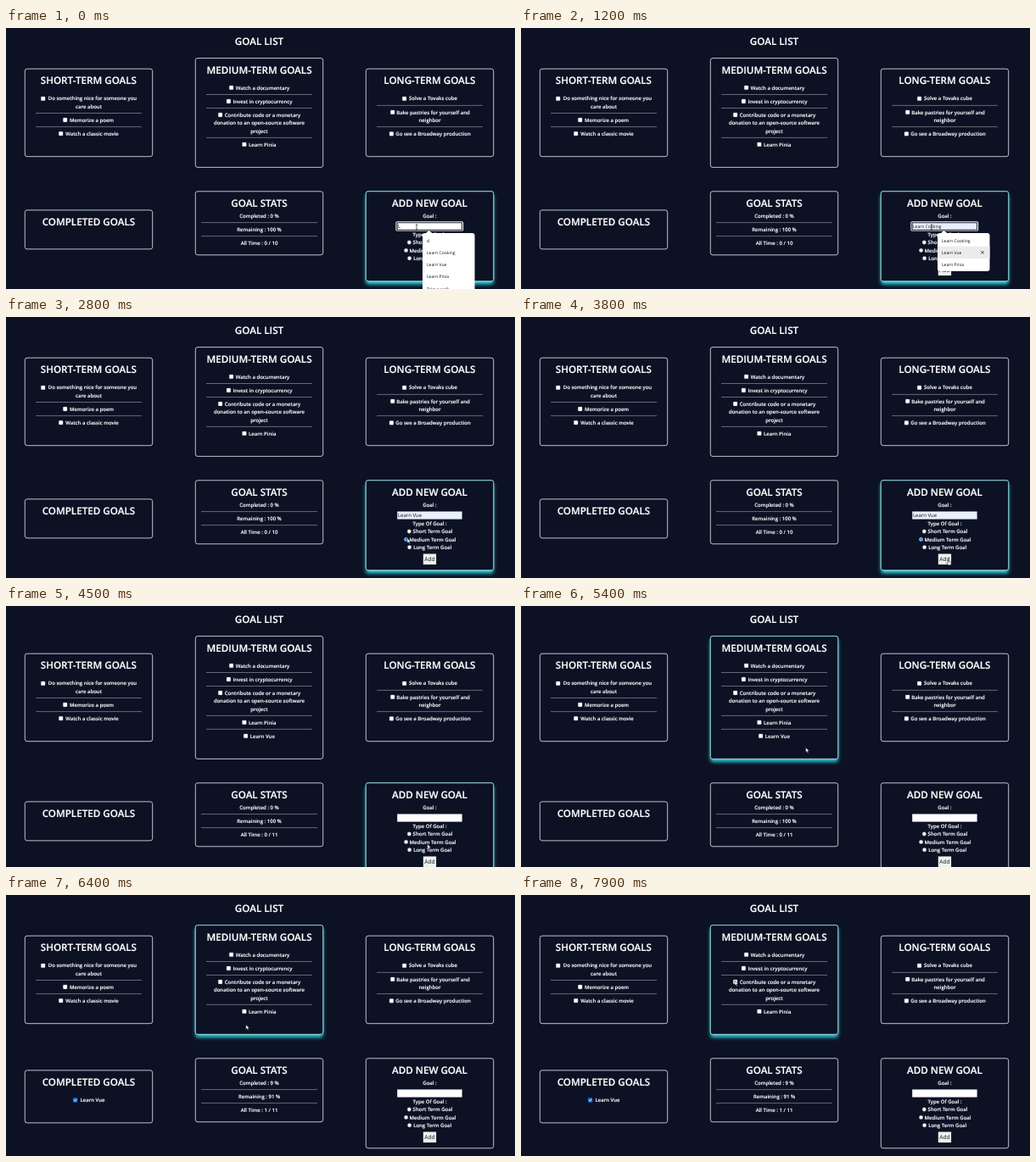
Write an HTML page that moves like this. It is 600 by 308 pixels and loops after 8 s.

```html
<!DOCTYPE html>
<html lang="en">
<head>
<meta charset="utf-8">
<title>Goal list</title>
<style>
  html, body { margin: 0; width: 100%; height: 100%; overflow: hidden; background: #0c1224; }
  svg { display: block; width: 600px; height: 308px; text-rendering: geometricPrecision; }
  text {
    font: 600 6px "Open Sans", "Noto Sans", sans-serif; text-anchor: middle;
    fill: #fff; stroke: #fff; stroke-width: .14px;
  }
  .head { font-size: 11.65px; stroke-width: .2px; }
  .field, .option, .button { font-weight: 400; fill: #111; stroke: none; }
  .field, .option { text-anchor: start; }
  .option { font-size: 5px; }
  .button { font-size: 6.6px; }
</style>
</head>
<body>
<svg viewBox="0 0 600 308" xmlns="http://www.w3.org/2000/svg">
  <defs>
    <filter id="blur" x="-20%" y="-20%" width="140%" height="140%"><feGaussianBlur stdDeviation="2.2"/></filter>
  </defs>
  <g id="scene"></g>
</svg>
<script>
const LOOP = 8000, BG = '#0c1224';
const FILTERED = 300, COOKING = 800, VUE = 1200, PREVIEW_VUE = 1300, ACCEPT = 1700;
const RADIO = 2700, ADD = 4200, LEAVE_ADD = 4700, ENTER_MEDIUM = 4900, DONE = 6400;

// Pointer stops: time, x, y
const path = [
  [0, 484, 232], [2000, 484, 232], [2600, 473, 261], [2900, 473, 261], [3600, 504, 286],
  [4400, 504, 286], [5200, 335.6, 167], [5500, 335.6, 167], [6100, 282.8, 153], [7000, 282.8, 153],
  [7800, 252, 101], [8000, 252, 101]
];

const scene = document.getElementById('scene');
const clamp = v => Math.max(0, Math.min(1, v));
const ease = v => v * v * (3 - 2 * v);
const ramp = (t, start) => clamp((t - start) / 300);

const rect = (x, y, w, h, fill, extra = '') =>
  `<rect x="${x}" y="${y}" width="${w}" height="${h}" fill="${fill}" ${extra}/>`;
const text = (s, x, y, cls = '') => `<text x="${x}" y="${y + 2.1}" class="${cls}">${s}</text>`;
const head = (s, x, y) => `<text x="${x}" y="${y + 4.1}" class="head">${s}</text>`;
const rule = (x1, x2, y) => `<path d="M${x1} ${y}H${x2}" stroke="#8a8d98" stroke-width=".7"/>`;
const group = (dy, body) => `<g transform="translate(0 ${dy})">${body}</g>`;

function card(x, y, h, glow = 0) {
  const frame = (stroke, extra = '') => rect(x, y, 150.4, h, BG, `rx="2.6" stroke="${stroke}" stroke-width=".85" ${extra}`);
  if (!glow) return frame('#dfe2e8');
  return rect(x, y + 3.6, 150.4, h, '#2fd0da', `rx="3" filter="url(#blur)" opacity="${glow}"`) +
    frame('#dfe2e8') + frame('#8fe6ec', `opacity="${glow}"`);
}

function box(x, y, checked) {
  return rect(x, y - 2.4, 4.8, 4.8, checked ? '#1a7df0' : '#fff',
    `rx=".8" stroke="${checked ? '#1a7df0' : '#999'}" stroke-width=".3"`) +
    (checked ? `<path d="M${x + 1} ${y}l1.1 1.2 1.9-2.4" fill="none" stroke="#fff" stroke-width=".8"/>` : '');
}

const item = (s, boxX, textX, y, checked) => box(boxX, y, checked) + text(s, textX, y);

function radio(s, cx, textX, y, on) {
  const dot = on ? `<circle cx="${cx}" cy="${y}" r="1.3" fill="#1a7df0"/>` : '';
  return `<circle cx="${cx}" cy="${y}" r="2.2" fill="#fff" stroke="${on ? '#1a7df0' : '#999'}" stroke-width=".5"/>` +
    dot + text(s, textX, y);
}

function shortGoals() {
  return card(22.3, 48.2, 103.5) + head('SHORT-TERM GOALS', 97.4, 62.2) +
    item('Do something nice for someone you', 41.3, 102, 83.3) + text('care about', 97.5, 93) + rule(35, 160, 100.5) +
    item('Memorize a poem', 67.3, 101, 108.5) + rule(35, 160, 116.6) +
    item('Watch a classic movie', 62.3, 101.5, 124.7);
}

function mediumGoals(withVue, glow) {
  return card(223.3, 35.6, withVue ? 144.8 : 128.8, glow) + head('MEDIUM-TERM GOALS', 298.5, 49.6) +
    item('Watch a documentary', 263.2, 302.5, 70.4) + rule(236, 361, 78.5) +
    item('Invest in cryptocurrency', 260, 302.5, 86.5) + rule(236, 361, 94.5) +
    item('Contribute code or a monetary', 250.2, 302.5, 102.5) +
    text('donation to an open-source software', 298.5, 112) + text('project', 298.5, 121.5) + rule(236, 361, 129.4) +
    item('Learn Pinia', 278.5, 302.2, 137.4) +
    (withVue ? rule(236, 361, 145.4) + item('Learn Vue', 280.2, 302.3, 153.4) : '');
}

function longGoals() {
  return card(424.3, 48.2, 103.5) + head('LONG-TERM GOALS', 499.4, 62.2) +
    item('Solve a Tovaks cube', 467.2, 503.5, 83.3) + rule(437, 562, 91.4) +
    item('Bake pastries for yourself and', 453.3, 503.5, 99.4) + text('neighbor', 499.5, 109) + rule(437, 562, 116.6) +
    item('Go see a Broadway production', 452, 503.5, 124.8);
}

function completed(done) {
  const y = done ? 206.9 : 214.9;
  return card(22.3, y, done ? 62 : 46) + head('COMPLETED GOALS', 97.4, y + 14.2) +
    (done ? item('Learn Vue', 79.2, 102, 242, true) : '');
}

function stats(done, total) {
  const percent = Math.round(100 * done / total);
  return card(223.3, 192.8, 75) + head('GOAL STATS', 298.5, 206.9) +
    text(`Completed : ${percent} %`, 298.5, 221.6) + rule(230, 367, 229.6) +
    text(`Remaining : ${100 - percent} %`, 298.5, 237.7) + rule(230, 367, 245.6) +
    text(`All Time : ${done} / ${total}`, 298.5, 253.8);
}

function input(t) {
  const filled = t >= COOKING && t < ADD;
  const focus = t < RADIO
    ? rect(460, 228.8, 78.5, 10.2, 'none', 'rx="1" stroke="#fff" stroke-width="1.2"') +
      rect(461, 229.8, 76.5, 8.4, 'none', 'stroke="#20242f" stroke-width=".9"') : '';
  let value = '', cls = 'field';
  if (t < COOKING) value = 'L';
  else if (t < PREVIEW_VUE) [value, cls] = ['Learn Cooking', 'option'];
  else if (t < ACCEPT) [value, cls] = ['Learn Vue', 'option'];
  else if (t < ADD) value = 'Learn Vue';
  const caret = t >= ACCEPT && t < RADIO && (t - ACCEPT) % 1000 < 500 ? rect(490, 231, .6, 6.5, '#111') : '';
  return rect(461.2, 229.5, 76.4, 9.1, filled ? '#e8f0fe' : '#fff') + focus + text(value, 462, 234.3, cls) + caret;
}

function newGoal(t, glow) {
  return card(424.3, 192.8, 106, glow) + head('ADD NEW GOAL', 499.4, 206.9) + text('Goal :', 499.5, 221.6) + input(t) +
    text('Type Of Goal :', 499.5, 243.6) +
    radio('Short Term Goal', 475.3, 503, 253) +
    radio('Medium Term Goal', 471.6, 503, 262.4, t >= RADIO && t < ADD) +
    radio('Long Term Goal', 475.6, 502.7, 271.7) +
    rect(491.8, 279.5, 15.3, 12.6, '#efefef') + text('Add', 499.5, 286, 'button');
}

function dropdown(t) {
  if (t >= ACCEPT) return '';
  const goals = ['Learn Cooking', 'Learn Vue', 'Learn Pinia'];
  const rows = t < FILTERED ? ['d', ...goals, 'Take a walk'] : goals;
  const picked = t < COOKING ? -1 : t < VUE ? 0 : 1;
  const height = rows.length * 14.2 + 2.4;
  return `<path d="M494.5 242.5l4-3.6 4 3.6z" fill="#fff"/>` + rect(491, 242, 61.5, height, '#fff', 'rx="3"') +
    rows.map((s, i) => {
      const y = 250.6 + i * 14.2;
      const mark = i === picked
        ? rect(491, y - 7.1, 61.5, 14.2, '#ececec') +
          `<path d="M542.3 ${y - 1.7}l3.4 3.4m0 -3.4l-3.4 3.4" stroke="#222" stroke-width=".8"/>` : '';
      return mark + text(s, 496, y, 'option');
    }).join('');
}

function pointer(t) {
  const i = path.findIndex(p => p[0] > t);
  const [a, b] = [path[i - 1], path[i]];
  const k = ease((t - a[0]) / (b[0] - a[0]));
  const x = a[1] + (b[1] - a[1]) * k, y = a[2] + (b[2] - a[2]) * k;
  const outline = 'fill="#fff" stroke="#111" stroke-width=".5" stroke-linejoin="round"';
  let shape = `<path d="M0 0v5.6l1.3-1.1 1 2.1 1-.5-1-2h1.7z" ${outline}/>`;
  if (y < 239 && x > 461) shape = '<path d="M-1.2 0h2.4M0 0v6M-1.2 6h2.4" stroke="#222" stroke-width=".7"/>';
  else if (t >= 3500 && t < 4500)
    shape = `<path d="M-.6 .4q.6-.8 1.2 0v2.2l2.4.6q.5 1.8-.5 3.6h-2.9l-2-2.6q.5-.8 1.8.2z" ${outline}/>`;
  return `<g transform="translate(${x} ${y})">${shape}</g>`;
}

function draw(t) {
  const added = t >= ADD, done = t >= DONE, grown = added && !done;
  const shift = grown ? 16 : 0;
  const addGlow = 1 - ramp(t, LEAVE_ADD), mediumGlow = ramp(t, ENTER_MEDIUM);
  scene.innerHTML = rect(0, 0, 600, 308, BG) + head('GOAL LIST', 298.5, 16.2) +
    group(shift / 2, shortGoals() + longGoals()) +
    mediumGoals(grown, mediumGlow) +
    group(shift, completed(done) + stats(done ? 1 : 0, added ? 11 : 10) + newGoal(t, addGlow)) +
    dropdown(t) + pointer(t);
}

let last = -1;
const start = performance.now();
function tick() {
  const t = Math.floor((performance.now() - start) % LOOP / 100) * 100;
  if (t !== last) draw(last = t);
  requestAnimationFrame(tick);
}
tick();
</script>
</body>
</html>
```
